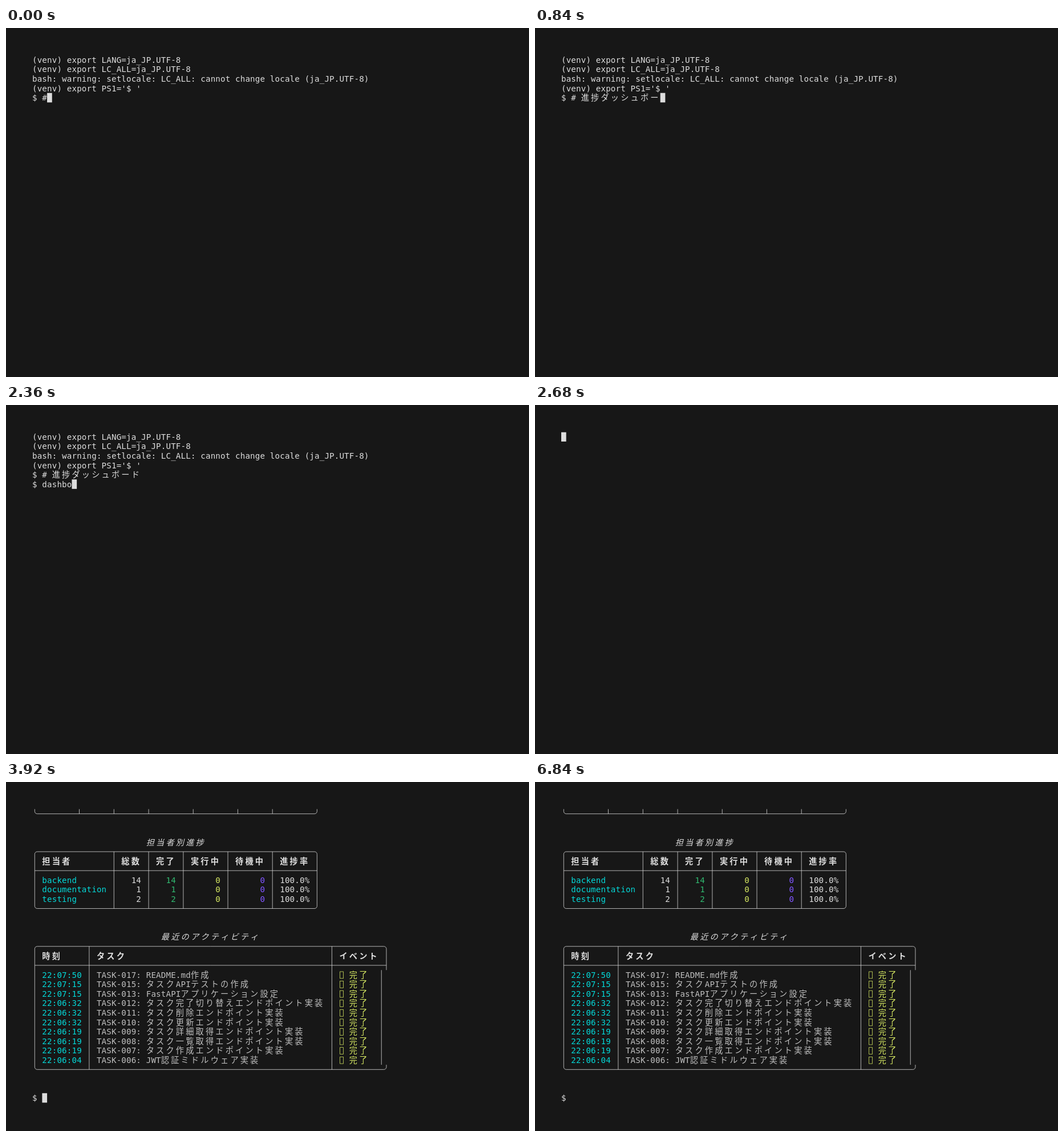
An HTML page with a canvas that plays this animation: 917 px wide and 611 px high, repeating every 7240 ms.

```html
<!DOCTYPE html>
<html lang="ja">
<head>
<meta charset="utf-8">
<style>
  html, body { margin: 0; height: 100%; overflow: hidden; background: #171717; }
  canvas { display: block; }
</style>
</head>
<body>
<canvas width="917" height="611"></canvas>
<script>
const ctx = document.querySelector('canvas').getContext('2d');
const LOOP = 7240, SCALE = 0.7895, CELL_W = 11, CELL_H = 21;
const BG = '#171717', FG = '#dddddd', WHITE = '#bfbfbf', CYAN = '#04d7d7',
      GREEN = '#31bb71', YELLOW = '#d3e561', BLUE = '#8056ff';

const session = [
  '(venv) export LANG=ja_JP.UTF-8',
  '(venv) export LC_ALL=ja_JP.UTF-8',
  'bash: warning: setlocale: LC_ALL: cannot change locale (ja_JP.UTF-8)',
  "(venv) export PS1='$ '",
];
const comment = '# 進捗ダッシュボード', command = 'dashboard';
const commentKeys = [40, 160, 280, 360, 480, 560, 680, 760, 840, 920];
const ENTER = 1000, COMMAND = 2040, KEY_GAP = 60, RUN = 2600, CLEAR = 2680, OUTPUT = 2720;
const blinks = [1600, COMMAND, 3320, 3920, 4480, 5080, 5680, 6240, 6840, LOOP];

const owners = [['backend', 14], ['documentation', 1], ['testing', 2]];
const activity = [
  ['22:07:50', 'TASK-017: README.md作成'],
  ['22:07:15', 'TASK-015: タスクAPIテストの作成'],
  ['22:07:15', 'TASK-013: FastAPIアプリケーション設定'],
  ['22:06:32', 'TASK-012: タスク完了切り替えエンドポイント実装'],
  ['22:06:32', 'TASK-011: タスク削除エンドポイント実装'],
  ['22:06:32', 'TASK-010: タスク更新エンドポイント実装'],
  ['22:06:19', 'TASK-009: タスク詳細取得エンドポイント実装'],
  ['22:06:19', 'TASK-008: タスク一覧取得エンドポイント実装'],
  ['22:06:19', 'TASK-007: タスク作成エンドポイント実装'],
  ['22:06:04', 'TASK-006: JWT認証ミドルウェア実装'],
];

// Writes text on the cell grid and returns the column after it.
function write(text, col, row, color = FG, style = '') {
  ctx.font = `${style} 18px "DejaVu Sans Mono", "Noto Sans CJK JP", "Noto Sans CJK", monospace`;
  ctx.fillStyle = color;
  for (const ch of text) {
    ctx.fillText(ch, col * CELL_W, (row + 1) * CELL_H);
    col += ch > '\u2e80' ? 2 : 1;
  }
  return col;
}

function writeRight(text, endCol, row, color) {
  write(String(text), endCol - String(text).length, row, color);
}

function fillCells(col, row, rows, color) {
  ctx.fillStyle = color;
  ctx.fillRect(col * CELL_W, row * CELL_H, CELL_W, rows * CELL_H);
}

const midX = col => (col + 0.5) * CELL_W;
const midY = row => (row + 0.5) * CELL_H;

function line(x1, y1, x2, y2) {
  ctx.moveTo(x1, y1);
  ctx.lineTo(x2, y2);
}

function table(cols, top, bottom) {
  const left = midX(cols[0]), right = midX(cols.at(-1));
  const y1 = midY(top), y2 = midY(bottom), rule = midY(top + 2);
  ctx.strokeStyle = FG;
  ctx.beginPath();
  ctx.roundRect(left, y1, right - left, y2 - y1, 5.5);
  line(left, rule, right, rule);
  for (const col of cols.slice(1, -1)) line(midX(col), y1, midX(col), y2);
  ctx.stroke();
}

function drawOwners() {
  write('担当者別進捗', 23, 3, FG, 'italic');
  table([0, 16, 23, 30, 39, 48, 57], 4, 10);
  const heads = { 担当者: 2, 総数: 18, 完了: 25, 実行中: 32, 待機中: 41, 進捗率: 50 };
  for (const head in heads) write(head, heads[head], 5, FG, 'bold');
  owners.forEach(([name, total], i) => {
    const row = 7 + i;
    write(name, 2, row, CYAN);
    writeRight(total, 22, row, FG);
    writeRight(total, 29, row, GREEN);
    writeRight(0, 38, row, YELLOW);
    writeRight(0, 47, row, BLUE);
    writeRight('100.0%', 56, row, FG);
  });
}

function drawActivity() {
  write('最近のアクティビティ', 26, 13, FG, 'italic');
  table([0, 11, 60, 71], 14, 27);
  // The wide status symbol pulls the right border one cell inward.
  fillCells(71, 17, 10, BG);
  ctx.beginPath();
  line(midX(70), 17 * CELL_H, midX(70), 27 * CELL_H);
  ctx.stroke();
  write('時刻', 2, 15, FG, 'bold');
  write('タスク', 13, 15, FG, 'bold');
  write('イベント', 62, 15, FG, 'bold');
  ctx.strokeStyle = YELLOW;
  activity.forEach(([time, task], i) => {
    const row = 17 + i;
    write(time, 2, row, CYAN);
    write(task, 13, row, WHITE);
    ctx.strokeRect(62 * CELL_W + 1.5, row * CELL_H + 3.5, 7.5, 15);
    write('完了', 64, row, YELLOW);
  });
}

// Both screens return the cursor position as [column, row].
function drawSession(t) {
  session.forEach((text, row) => write(text, 0, row));
  const typed = 1 + commentKeys.filter(key => t >= key).length;
  const col = write('$ ' + comment.slice(0, typed), 0, 4);
  if (t < ENTER) return [col, 4];
  const keys = t < COMMAND ? 0 : Math.floor((t - COMMAND) / KEY_GAP) + 1;
  const end = write('$ ' + command.slice(0, keys), 0, 5);
  return t < RUN ? [end, 5] : [0, 6];
}

function drawOutput() {
  table([0, 9, 16, 23, 32, 41, 48, 57], -6, 0);
  drawOwners();
  drawActivity();
  return [write('$ ', 0, 30), 30];
}

function draw(t) {
  ctx.setTransform(1, 0, 0, 1, 0, 0);
  ctx.fillStyle = BG;
  ctx.fillRect(0, 0, 917, 611);
  ctx.save();
  ctx.setTransform(SCALE, 0, 0, SCALE, 46, 47.4);
  ctx.beginPath();
  ctx.rect(0, 0, 95 * CELL_W, 32 * CELL_H);
  ctx.clip();
  ctx.textBaseline = 'ideographic';
  const [col, row] = t < CLEAR ? drawSession(t) : t < OUTPUT ? [0, 0] : drawOutput();
  if (blinks.filter(time => t >= time).length % 2 === 0) fillCells(col, row, 1, FG);
  ctx.restore();
}

const start = performance.now();
function tick() {
  draw((performance.now() - start) % LOOP);
  requestAnimationFrame(tick);
}
tick();
</script>
</body>
</html>
```
